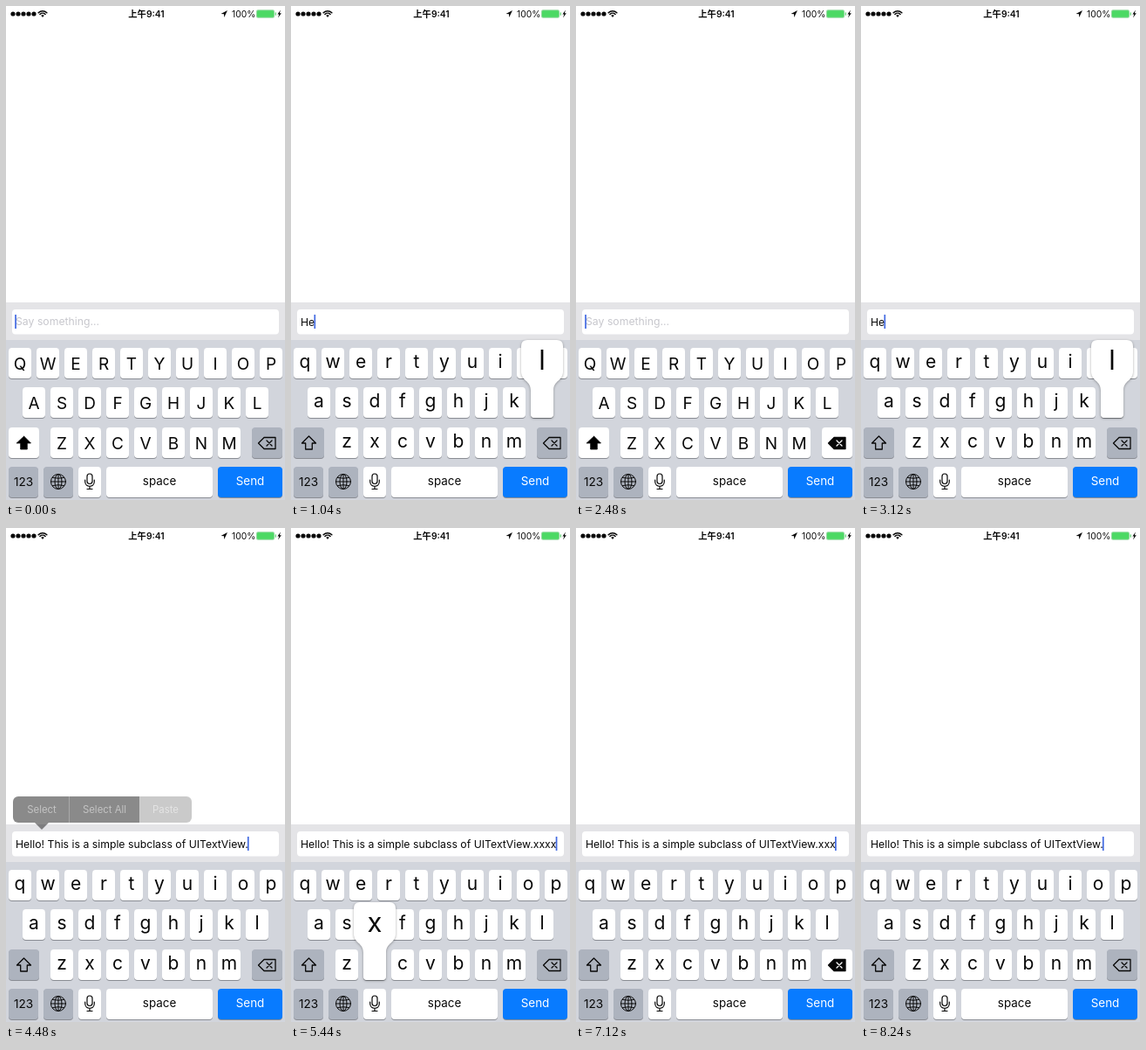
These frames come from a looping animation (320x565 px, 8.32 s). An HTML page with a canvas:

```html
<!DOCTYPE html>
<html lang="en">
<head>
<meta charset="utf-8">
<title>Growing text input</title>
<style>
html, body { margin: 0; width: 100%; height: 100%; overflow: hidden; background: #fff; }
canvas { display: block; width: 320px; height: 565px; }
</style>
</head>
<body>
<canvas id="stage"></canvas>
<script>
const W = 320, H = 565, LOOP = 8320;
const canvas = document.getElementById('stage');
const ctx = canvas.getContext('2d');
const ratio = window.devicePixelRatio || 1;
canvas.width = W * ratio;
canvas.height = H * ratio;

const FONT = 'Inter, "Noto Sans CJK SC", "Noto Sans", sans-serif';
const INK = '#080808', GRAY_KEY = '#adb3be', BLUE = '#087bff';
const PASTED = '! This is a simple subclass of UITextView.';
const WRAP_AT = 'Hello! This is a simple subclass of '.length;
const HOLD = 120, RESIZE = 240;

// Key taps in ms; '<' deletes, '*' pastes.
const taps = [
  [320, 'H'], [640, 'e'], [960, 'l'], [1200, 'l'], [1520, 'o'],
  [1840, '<'], [2000, '<'], [2160, '<'], [2320, '<'], [2480, '<'],
  [2640, 'H'], [2840, 'e'], [3060, 'l'], [3300, 'l'], [3560, 'o'],
  [4320, '*'],
  [4740, 'x'], [4900, 'x'], [5060, 'x'], [5220, 'x'], [5400, 'x'], [5620, 'x'],
  [6640, '<'], [6860, '<'], [7080, '<'], [7300, '<'], [7520, '<'], [7740, '<']
];
const GROW = 5520, SHRINK = 6860;
const MENU_IN = 3920, MENU_OUT = 4360;

const rows = [
  { letters: 'qwertyuiop', x: 3, y: 391 },
  { letters: 'asdfghjkl', x: 19, y: 436 },
  { letters: 'zxcvbnm', x: 51, y: 482 }
];

const clamp = v => Math.max(0, Math.min(1, v));
const ease = v => { v = clamp(v); return v * v * (3 - 2 * v); };

function typedAt(t) {
  let text = '';
  for (const [at, key] of taps) {
    if (key === '<') { if (t >= at) text = text.slice(0, -1); }
    else if (key === '*') { if (t >= at) text += PASTED; }
    else if (t >= at + HOLD) text += key;
  }
  return text;
}

function label(text, x, y, size, color = INK, align = 'center', weight = 400) {
  ctx.font = `${weight} ${size}px ${FONT}`;
  ctx.fillStyle = color;
  ctx.textAlign = align;
  ctx.fillText(text, x, y);
}

function rect(x, y, w, h, color) {
  ctx.fillStyle = color;
  ctx.fillRect(x, y, w, h);
}

function round(x, y, w, h, r, color) {
  ctx.fillStyle = color;
  ctx.beginPath();
  ctx.roundRect(x, y, w, h, r);
  ctx.fill();
}

function poly(points, fill, stroke, width = 1.3) {
  ctx.beginPath();
  points.forEach(([x, y]) => ctx.lineTo(x, y));
  ctx.closePath();
  ctx.lineJoin = 'round';
  if (fill) { ctx.fillStyle = fill; ctx.fill(); }
  if (stroke) { ctx.strokeStyle = stroke; ctx.lineWidth = width; ctx.stroke(); }
}

function strokePath(draw, color = INK, width = 1.2) {
  ctx.strokeStyle = color;
  ctx.lineWidth = width;
  ctx.lineCap = 'round';
  ctx.beginPath();
  draw();
  ctx.stroke();
}

function key(x, y, w, color = '#fff') {
  round(x, y + 1.1, w, 35, 4, '#898c93');
  round(x, y, w, 35, 4, color);
}

function statusBar() {
  for (let i = 0; i < 5; i++) {
    ctx.fillStyle = INK;
    ctx.beginPath();
    ctx.arc(8 + i * 6, 9, 2.6, 0, 7);
    ctx.fill();
  }
  for (const r of [6.8, 4.3]) {
    strokePath(() => ctx.arc(42, 12.5, r, -Math.PI * 0.75, -Math.PI * 0.25), INK, 1.6);
  }
  poly([[42, 13], [40.2, 10.7], [42, 10], [43.8, 10.7]], INK);
  label('上午9:41', 161, 12.7, 10.3, INK, 'center', 600);
  poly([[254, 5], [246.5, 9], [250, 9.2], [250.2, 13]], INK);
  label('100%', 259, 12.7, 10.3, INK, 'left');
  round(287, 4.3, 21, 9.4, 2, '#8fd99c');
  round(288, 5.2, 19, 7.6, 1.3, '#4cd964');
  round(308.6, 7.2, 1.3, 3.6, 0.6, '#62d575');
  poly([[315, 4.5], [311.4, 9.6], [313.3, 9.6], [312, 13.5], [315.8, 8.2], [313.8, 8.2]], INK);
}

function inputBar(t, text) {
  const grow = ease((t - GROW) / RESIZE) - ease((t - SHRINK) / RESIZE);
  const top = 347 - 15.8 * grow;
  rect(0, top - 8, W, 390 - top, '#e4e4e7');
  round(7, top, 306, 375.5 - top, 4, '#fff');

  const lines = text.endsWith('xxxxx')
    ? [text.slice(0, WRAP_AT), text.slice(WRAP_AT)] : [text];
  ctx.save();
  ctx.beginPath();
  ctx.rect(7, top, 306, 375.5 - top);
  ctx.clip();
  if (!text) label('Say something...', 11, 365.4, 12.25, '#c7c7cd', 'left');
  lines.forEach((line, i) => label(line, 11, top + 18.5 + i * 15.6, 12.25, INK, 'left'));
  const last = lines.length - 1;
  const caret = 10.2 + ctx.measureText(lines[last]).width * (text ? 1 : 0);
  rect(caret, top + 6 + last * 15.6, 1.7, 16, '#4169e1');
  ctx.restore();
}

function menu(t) {
  const alpha = clamp((t - MENU_IN) / 160) * (1 - clamp((t - MENU_OUT) / 240));
  if (alpha <= 0) return;
  const pressed = t >= MENU_OUT - 120;
  ctx.save();
  ctx.globalAlpha = alpha;
  ctx.beginPath();
  ctx.roundRect(8, 307, 205, 30, 6);
  ctx.save();
  ctx.clip();
  rect(8, 307, 145, 30, '#141414');
  rect(153, 307, 60, 30, pressed ? '#949494' : '#141414');
  rect(72, 307, 0.8, 30, '#d8d8d8');
  rect(153, 307, 0.8, 30, '#d8d8d8');
  ctx.restore();
  poly([[33, 337], [49, 337], [41, 345]], '#141414');
  label('Select', 41, 326.3, 11.4, '#fff');
  label('Select All', 113, 326.3, 11.4, '#fff');
  label('Paste', 183, 326.3, 11.4, '#fff');
  ctx.restore();
}

function shiftKey(active) {
  key(3, 482, 35, active ? '#fff' : GRAY_KEY);
  const arrow = [[20.5, 492], [28.5, 500], [24.3, 500], [24.3, 507],
    [16.7, 507], [16.7, 500], [12.5, 500]];
  poly(arrow, active ? '#000' : null, INK, active ? 0.8 : 1.3);
}

function deleteKey(down) {
  key(282, 482, 35, down ? '#fff' : GRAY_KEY);
  poly([[289.5, 500], [296, 493.5], [309, 493.5], [309, 506.5], [296, 506.5]],
    down ? INK : null, INK);
  strokePath(() => {
    ctx.moveTo(299, 497); ctx.lineTo(305, 503);
    ctx.moveTo(305, 497); ctx.lineTo(299, 503);
  }, down ? '#fff' : INK, 1.3);
}

function bottomRow() {
  key(3, 527, 34, GRAY_KEY);
  label('123', 20, 549, 13.6);
  key(43, 527, 34, GRAY_KEY);
  strokePath(() => {
    ctx.arc(60, 544, 8.5, 0, 7);
    ctx.moveTo(64, 544); ctx.ellipse(60, 544, 4, 8.5, 0, 0, 7);
    ctx.moveTo(60, 535.5); ctx.lineTo(60, 552.5);
    ctx.moveTo(51.5, 544); ctx.lineTo(68.5, 544);
    ctx.moveTo(53.5, 539.5); ctx.quadraticCurveTo(60, 541, 66.5, 539.5);
    ctx.moveTo(53.5, 548.5); ctx.quadraticCurveTo(60, 547, 66.5, 548.5);
  }, INK, 1);
  key(83, 527, 26);
  strokePath(() => {
    ctx.roundRect(93, 535, 6, 11.5, 3);
    ctx.moveTo(90.7, 542); ctx.lineTo(90.7, 544);
    ctx.bezierCurveTo(90.7, 551, 101.3, 551, 101.3, 544); ctx.lineTo(101.3, 542);
    ctx.moveTo(96, 549.3); ctx.lineTo(96, 552.5);
    ctx.moveTo(93, 552.5); ctx.lineTo(99, 552.5);
  });
  key(115, 527, 122);
  label('space', 176, 548.3, 13.4);
  key(243, 527, 74, BLUE);
  label('Send', 280, 548.3, 13.4, '#fff');
}

function popup(letter) {
  const row = rows.find(r => r.letters.includes(letter.toLowerCase()));
  const x = row.x + row.letters.indexOf(letter.toLowerCase()) * 32;
  const mid = x + 13, y = row.y, top = y - 54;
  ctx.save();
  ctx.shadowColor = 'rgba(0,0,0,.35)';
  ctx.shadowBlur = 3 * ratio;
  ctx.shadowOffsetY = 0.8 * ratio;
  ctx.fillStyle = '#fff';
  ctx.beginPath();
  ctx.moveTo(mid - 17, top);
  ctx.lineTo(mid + 17, top);
  ctx.quadraticCurveTo(mid + 24, top, mid + 24, top + 7);
  ctx.lineTo(mid + 24, y - 18);
  ctx.bezierCurveTo(mid + 24, y - 7, mid + 13, y - 8, mid + 13, y + 4);
  ctx.lineTo(mid + 13, y + 31);
  ctx.quadraticCurveTo(mid + 13, y + 35, mid + 9, y + 35);
  ctx.lineTo(mid - 9, y + 35);
  ctx.quadraticCurveTo(mid - 13, y + 35, mid - 13, y + 31);
  ctx.lineTo(mid - 13, y + 4);
  ctx.bezierCurveTo(mid - 13, y - 8, mid - 24, y - 7, mid - 24, y - 18);
  ctx.lineTo(mid - 24, top + 7);
  ctx.quadraticCurveTo(mid - 24, top, mid - 17, top);
  ctx.fill();
  ctx.restore();
  label(letter, mid, y - 20, 31);
}

function keyboard(upper, tapped) {
  rect(0, 382, W, H - 382, '#d2d5dc');
  for (const { letters, x, y } of rows) {
    [...letters].forEach((letter, i) => {
      const left = x + i * 32;
      key(left, y, 26);
      if (upper) label(letter.toUpperCase(), left + 13, y + 24.5, 19);
      else label(letter, left + 13, y + 23, 21);
    });
  }
  shiftKey(upper);
  deleteKey(tapped === '<');
  bottomRow();
  if (tapped && /[a-z]/i.test(tapped)) popup(tapped);
}

function draw(now) {
  const t = now % LOOP;
  const text = typedAt(t);
  const tap = taps.find(([at]) => t >= at && t < at + HOLD);
  ctx.setTransform(ratio, 0, 0, ratio, 0, 0);
  rect(0, 0, W, H, '#fff');
  statusBar();
  inputBar(t, text);
  keyboard(!text, tap && tap[1]);
  menu(t);
}

const start = performance.now();
function frame() {
  draw(performance.now() - start);
  requestAnimationFrame(frame);
}
frame();
</script>
</body>
</html>
```
